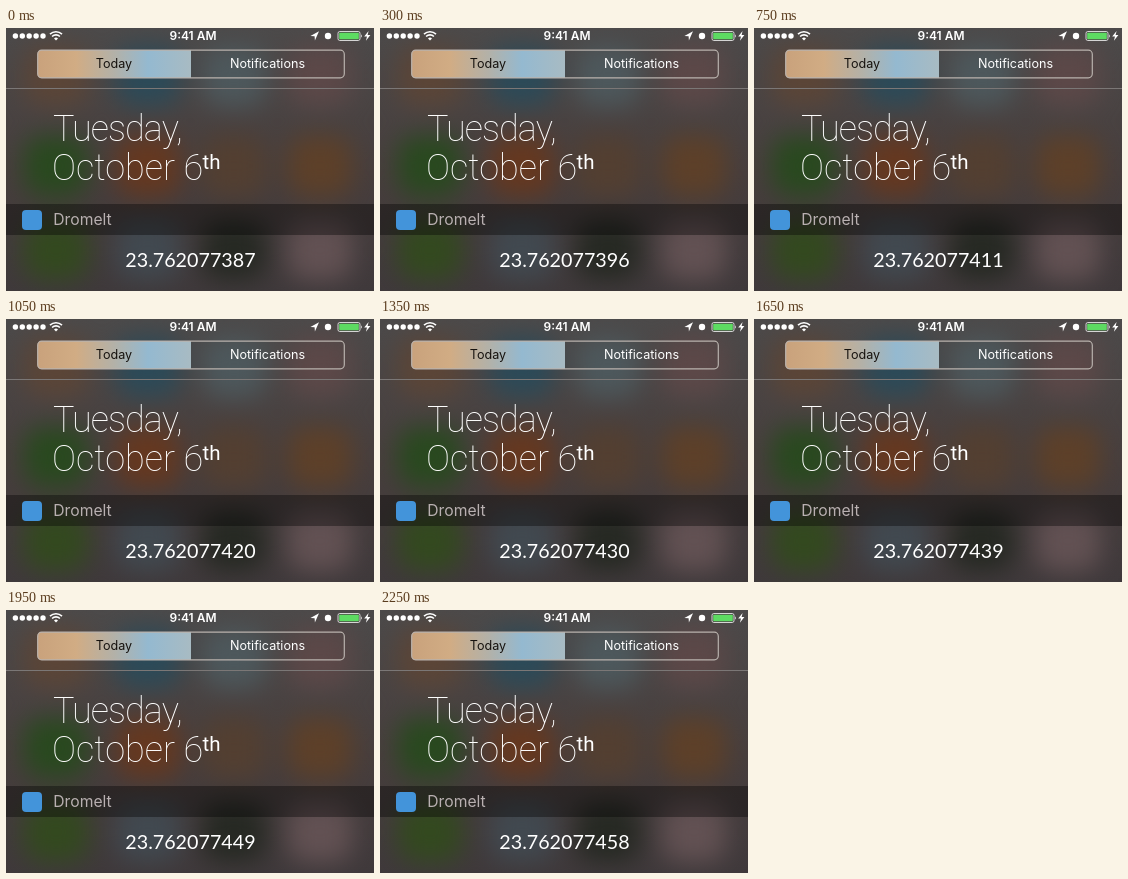
An HTML page for the animation above (2350 ms loop, 368 px wide and 263 px high).

```html
<!DOCTYPE html>
<html lang="en">
<head>
<meta charset="utf-8">
<title>Today view</title>
<style>
  html, body { margin: 0; width: 100%; height: 100%; overflow: hidden; background: #413b3b; }
  svg { display: block; width: 368px; height: 263px; }
  text { font-family: Inter, Roboto, sans-serif; fill: #fff; }
  .clock { font-size: 12px; font-weight: 600; }
  .tab { font-size: 12.6px; }
  .date { font-family: Roboto, Inter, sans-serif; font-size: 36px; font-weight: 200; }
  .suffix { font-family: Roboto, Inter, sans-serif; font-size: 20.5px; }
  .title { font-size: 15.7px; fill: #b9b0b1; }
  .count { font-family: Lato, "Open Sans", sans-serif; font-size: 19.7px; font-variant-numeric: tabular-nums; }
</style>
</head>
<body>
<svg viewBox="0 0 368 263">
  <defs>
    <linearGradient id="base" x2="0" y2="1">
      <stop stop-color="#4c4a4a"/>
      <stop offset=".55" stop-color="#473e3d"/>
      <stop offset="1" stop-color="#3f393b"/>
    </linearGradient>
    <linearGradient id="tabFill">
      <stop stop-color="#c9a27c"/>
      <stop offset=".25" stop-color="#d1ac84"/>
      <stop offset=".5" stop-color="#b3b1a8"/>
      <stop offset=".72" stop-color="#94b9d0"/>
      <stop offset="1" stop-color="#a8bbc3"/>
    </linearGradient>
    <filter id="soft" x="-20%" y="-20%" width="140%" height="140%" color-interpolation-filters="sRGB">
      <feGaussianBlur stdDeviation="12"/>
    </filter>
  </defs>

  <!-- Blurred wallpaper -->
  <rect width="368" height="263" fill="url(#base)"/>
  <g id="blobs" filter="url(#soft)"></g>

  <!-- Status bar -->
  <g fill="#fff">
    <circle cx="9.4" cy="8" r="2.7"/>
    <circle cx="16.3" cy="8" r="2.7"/>
    <circle cx="23.2" cy="8" r="2.7"/>
    <circle cx="30.1" cy="8" r="2.7"/>
    <circle cx="37" cy="8" r="2.7"/>
    <path d="M50 12.6l-2-2.2a2.9 2.9 0 0 1 4 0z"/>
    <path d="M46.1 8.5a5.6 5.6 0 0 1 7.8 0M44 6.1a8.7 8.7 0 0 1 12 0" fill="none" stroke="#fff" stroke-width="1.6"/>
    <path d="M313 3.2l-8.6 4.7 4.2.3.3 4.3z"/>
    <circle cx="322" cy="8" r="3.2"/>
    <path d="M355 6.2q1.7 1.8 0 3.6z"/>
    <path d="M362.6 3l-4.4 5.6h2.8l-1.1 4.2 4.5-5.8h-2.8z"/>
  </g>
  <rect x="332" y="3.5" width="22" height="9" rx="1.8" fill="none" stroke="#d5d5d5"/>
  <rect x="333.2" y="4.7" width="19.6" height="6.6" rx=".8" fill="#5ddb62"/>
  <text class="clock" x="187" y="12.3" text-anchor="middle">9:41 AM</text>

  <!-- Tabs -->
  <path d="M185 22H35.5a4 4 0 0 0-4 4v20a4 4 0 0 0 4 4H185z" fill="url(#tabFill)"/>
  <rect x="31.7" y="22.2" width="306.6" height="27.6" rx="4" fill="none" stroke="#b9b2ad" stroke-width="1.2"/>
  <text class="tab" x="108" y="40.4" text-anchor="middle" style="fill:#17130f">Today</text>
  <text class="tab" x="261.5" y="40.4" text-anchor="middle">Notifications</text>
  <path d="M0 60.5H368" stroke="#7b7776"/>

  <!-- Date -->
  <text class="date" x="47" y="112.5" letter-spacing="-.9">Tuesday,</text>
  <text class="date" x="46" y="151.5">October 6</text>
  <text class="suffix" x="196.5" y="141">th</text>

  <!-- Widget -->
  <rect y="176" width="368" height="31" fill="#000" fill-opacity=".36"/>
  <rect x="16" y="182" width="20" height="20" rx="4" fill="#4394da"/>
  <text class="title" x="47.3" y="197.4">Dromelt</text>
  <text class="count" id="count" x="119.3" y="239.2">23.762077387</text>
</svg>
<script>
  const LOOP = 2350, STEP = 150, START = 387, PER_STEP = 71 / 15;
  const columns = [50, 142, 228, 314], rows = [48, 138, 222];
  const colors = [
    '#5b4537', '#2c4a58', '#4d585c', '#5c4848',
    '#29491f', '#653820', '#533f31', '#5d4029',
    '#33491f', '#414950', '#262923', '#625153'
  ];

  const blobs = document.getElementById('blobs');
  colors.forEach((fill, i) => {
    const blob = document.createElementNS('http://www.w3.org/2000/svg', 'rect');
    const box = { x: columns[i % 4] - 32, y: rows[i >> 2] - 30, width: 64, height: 60, rx: 18, fill };
    for (const key in box) blob.setAttribute(key, box[key]);
    blobs.append(blob);
  });

  const count = document.getElementById('count');
  const origin = performance.now();

  function draw(now) {
    const step = Math.floor((Math.max(0, now - origin) % LOOP) / STEP);
    const text = '23.762077' + Math.round(START + step * PER_STEP);
    if (count.textContent !== text) count.textContent = text;
    requestAnimationFrame(draw);
  }
  requestAnimationFrame(draw);
</script>
</body>
</html>
```
